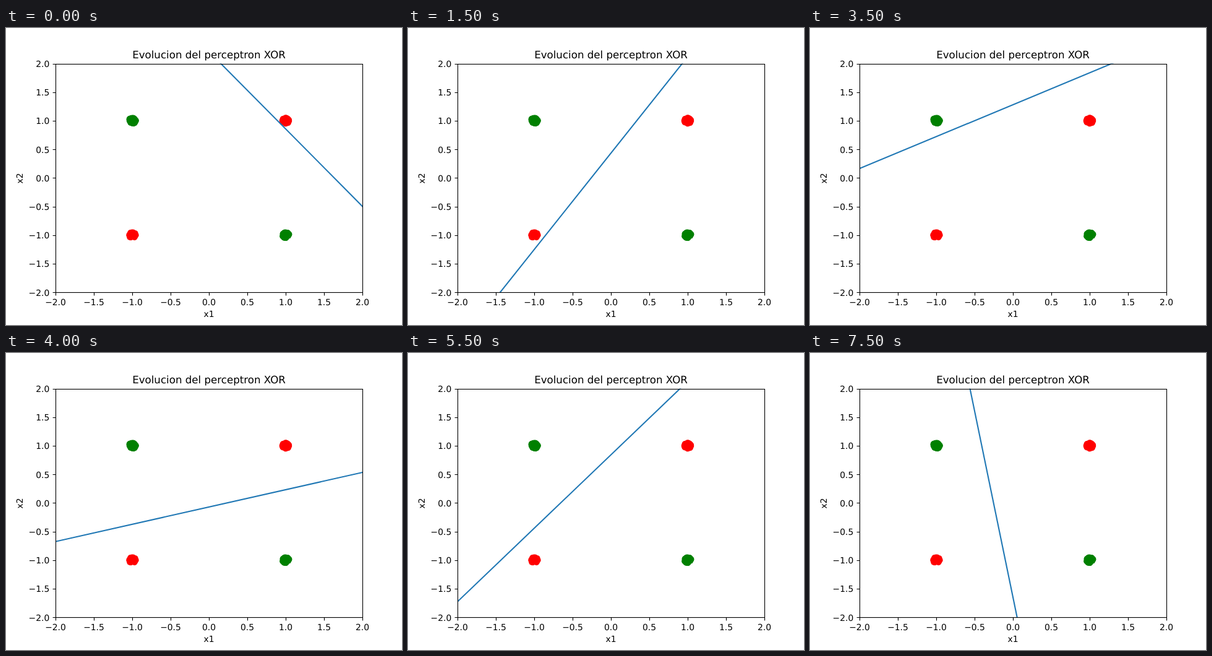
Write an HTML page that moves like this. It is 640 px wide and 480 px high and loops after 8 s.

```html
<!DOCTYPE html>
<html lang="es">
<head>
<meta charset="utf-8">
<style>
  html, body { margin: 0; width: 100%; height: 100%; overflow: hidden; background: #fff; }
  svg { display: block; width: 640px; height: 480px; }
  text { font: 13.89px "DejaVu Sans", sans-serif; text-anchor: middle; text-rendering: geometricPrecision; }
  .title { font-size: 16.67px; }
  .end { text-anchor: end; }
  .axis { fill: none; stroke: #000; stroke-width: 1.11; }
</style>
</head>
<body>
<svg viewBox="0 0 640 480">
  <clipPath id="area"><rect x="80" y="57.6" width="496" height="369.6"/></clipPath>
  <g id="points"></g>
  <line id="boundary" clip-path="url(#area)" stroke="#1f77b4" stroke-width="2.08"/>
  <g id="ticks"></g>
  <rect class="axis" x="80.5" y="58.5" width="496" height="369"/>
  <text class="title" x="328" y="49">Evolucion del perceptron XOR</text>
  <text x="328" y="467">x1</text>
  <text transform="translate(27 242.9) rotate(-90)">x2</text>
</svg>
<script>
const STEP = 500, STEPS = 16;
const px = x => 328 + 124 * x;
const py = y => 242.4 - 92.4 * y;
const $ = id => document.getElementById(id);

function add(parent, tag, attrs, text = '') {
  const el = document.createElementNS('http://www.w3.org/2000/svg', tag);
  for (const key in attrs) el.setAttribute(key, attrs[key]);
  el.textContent = text;
  parent.append(el);
}

let seed = 7;
function random() {
  seed = seed * 16807 % 2147483647;
  return seed / 2147483647;
}

// Noisy samples around each XOR corner
for (const x of [-1, 1]) {
  for (const y of [-1, 1]) {
    for (let i = 0; i < 60; i++) {
      const angle = 2 * Math.PI * random();
      const spread = Math.sqrt(random());
      add($('points'), 'circle', {
        cx: px(x) + 5.9 * spread * Math.cos(angle),
        cy: py(y) + 4.8 * spread * Math.sin(angle),
        r: 4.86,
        fill: x === y ? 'red' : 'green'
      });
    }
  }
}

for (let value = -2; value <= 2; value += 0.5) {
  const label = value.toFixed(1).replace('-', '\u2212');
  const x = Math.round(px(value)) + 0.5;
  const y = Math.round(py(value)) + 0.5;
  add($('ticks'), 'path', { class: 'axis', d: `M${x} 427.5v4.9M80.5 ${y}h-4.9` });
  add($('ticks'), 'text', { x: px(value), y: 448 }, label);
  add($('ticks'), 'text', { class: 'end', x: 70.3, y: Math.round(py(value) + 5.3) }, label);
}

// Decision line key poses; an offset of 3 lies outside the plot
const poses = [
  { step: 0, angle: 126.47, offset: -1.314 },
  { step: 3, angle: 59.33, offset: 0.222 },
  { step: 5, angle: 76.23, offset: 0.26 },
  { step: 6, angle: 31, offset: 0.43 },
  { step: 7, angle: 29.19, offset: 1.119 },
  { step: 8, angle: 16.83, offset: -0.067 },
  { step: 9, angle: 12.95, offset: 0.049 },
  { step: 10, angle: 0, offset: 3 },
  { step: 11, angle: 52.1, offset: 0.518 },
  { step: 12, angle: 47.7, offset: -0.336 },
  { step: 13, angle: 96.73, offset: 0.246 },
  { step: 15, angle: 98.73, offset: 0.25 }
];

function poseAt(step) {
  const next = poses.findIndex(pose => pose.step >= step);
  const to = poses[next], from = poses[Math.max(0, next - 1)];
  const k = (step - from.step) / (to.step - from.step || 1);
  const mix = key => from[key] + (to[key] - from[key]) * k;
  return { angle: mix('angle') * Math.PI / 180, offset: mix('offset') };
}

function draw(time) {
  const { angle, offset } = poseAt(Math.floor(time / STEP) % STEPS);
  const cos = Math.cos(angle), sin = Math.sin(angle);
  [-5, 5].forEach((reach, i) => {
    $('boundary').setAttribute('x' + (i + 1), px(reach * cos - offset * sin));
    $('boundary').setAttribute('y' + (i + 1), py(reach * sin + offset * cos));
  });
}

const start = performance.now();
function tick() {
  draw(performance.now() - start);
  requestAnimationFrame(tick);
}
tick();
</script>
</body>
</html>
```
